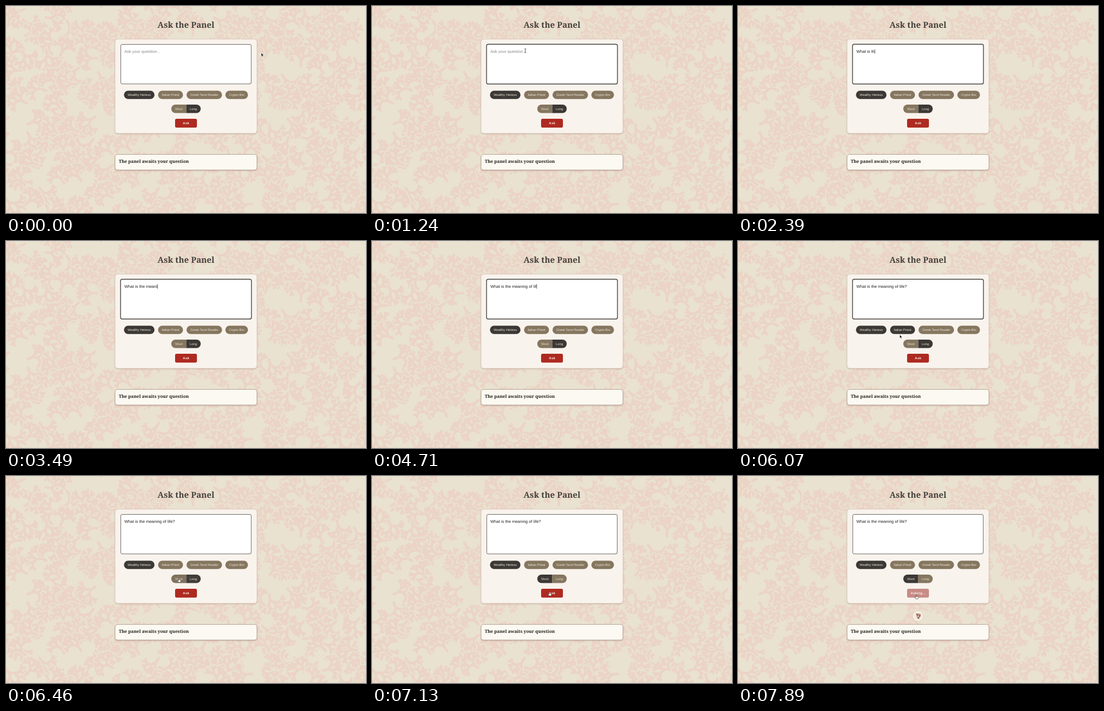
An HTML page with a canvas that plays this animation: 660x380 px, repeating every 7.99 s.

```html
<!DOCTYPE html>
<html lang="en">
<head>
<meta charset="utf-8">
<title>Ask the Panel</title>
<style>
html, body { margin: 0; width: 660px; height: 380px; overflow: hidden; background: #e9e2d0; }
canvas, svg { position: absolute; left: 0; top: 0; }
text { font-family: "Liberation Sans", Arial, sans-serif; text-rendering: geometricPrecision; }
.serif { font-family: "Noto Serif", Georgia, serif; font-weight: bold; }
.pill { font-size: 5.85px; fill: #ece4d6; text-anchor: middle; }
.ask { font-size: 6px; font-weight: bold; letter-spacing: .25px; fill: #fbeeea; text-anchor: middle; }
.field { font-size: 7.53px; }
</style>
</head>
<body>
<canvas id="coral" width="660" height="380"></canvas>
<svg width="660" height="380" viewBox="0 0 660 380">
  <defs>
    <filter id="shade" x="-5%" y="-10%" width="110%" height="130%">
      <feDropShadow dx="0" dy="1" stdDeviation="1.2" flood-color="#7d5c4c" flood-opacity=".35"/>
    </filter>
    <clipPath id="toggle"><rect x="303" y="181" width="54" height="15.5" rx="7.75"/></clipPath>
  </defs>
  <text class="serif" x="330" y="40.3" font-size="15.2" fill="#45413c" text-anchor="middle">Ask the Panel</text>
  <rect x="200" y="61" width="260" height="172.7" rx="5" fill="#f9f3ed" stroke="#dcc6ba" stroke-width=".7" filter="url(#shade)"/>
  <rect id="area" fill="#fff" stroke="#46423e"/>
  <path d="M446 142l2.5-2.5M447.6 142l1-1" stroke="#999" stroke-width=".4"/>
  <text id="field" class="field" x="217" y="86"></text>
  <rect id="caret" y="79.3" width=".7" height="8.4" fill="#222"/>
  <g id="pills"></g>
  <g clip-path="url(#toggle)">
    <rect id="short" x="303" y="181" width="27.5" height="16"/>
    <rect id="long" x="330.5" y="181" width="27" height="16"/>
  </g>
  <text class="pill" x="317" y="190.8">Short</text>
  <text class="pill" x="343.5" y="190.8">Long</text>
  <rect id="button" x="310" y="207" width="40" height="16.3" rx="2.8"/>
  <text id="ask" class="ask" x="330.2" y="217.2"></text>
  <g id="loader">
    <circle r="10" fill="#f5ecdf" stroke="#dccdbb" stroke-width=".6"/>
    <g id="spin">
      <path d="M-4-5L5-4 3 4-2 5z" fill="#d6aca2"/>
      <path d="M-3-5l3 3-2 2zM1 0l4-3-1 5zM-1 3l3-1 0 4z" fill="#69534c"/>
      <circle cx="1" cy="-3" r="1.3" fill="#b65c52"/>
    </g>
  </g>
  <rect x="200" y="272.5" width="260" height="28.5" rx="4.5" fill="#fbf9f2" stroke="#ad9787" stroke-width=".8" filter="url(#shade)"/>
  <text class="serif" x="206.7" y="288.2" font-size="8.1" fill="#24211e">The panel awaits your question</text>
  <g id="pointer">
    <path id="arrow" d="M0 0V6.4L1.5 5.1 2.6 7.5 3.6 7 2.6 4.7H4.6Z" fill="#111" stroke="#fff" stroke-width=".5"/>
    <path id="beam" d="M-1.4-3.6Q0-3.6 0-2.8Q0-3.6 1.4-3.6M0-2.8V2.8M-1.4 3.6Q0 3.6 0 2.8Q0 3.6 1.4 3.6" fill="none" stroke="#222" stroke-width=".8"/>
    <path id="hand" d="M-.7 0Q0-.9.7 0V2.5L3.2 3.2Q3.8 3.5 3.6 4.6L2.9 7H-1.2L-3 4Q-2.6 3-.7 4.4Z" fill="#fff" stroke="#222" stroke-width=".6"/>
  </g>
</svg>
<script>
const LOOP = 7990, DARK = [59, 56, 53], TAN = [133, 118, 95];
const RED = [174, 42, 32], ROSE = [200, 139, 133];
const QUESTION = "What is the meaning of life?";
const $ = id => document.getElementById(id);
const set = (el, attrs) => { for (const k in attrs) el.setAttribute(k, attrs[k]); };
const show = (id, on) => { $(id).style.display = on ? "" : "none"; };
const ramp = (t, from, span) => Math.min(1, Math.max(0, (t - from) / span));
const mix = (a, b, p) => `rgb(${a.map((v, i) => Math.round(v + (b[i] - v) * p))})`;

// Seeded coral wallpaper
function drawCoral() {
  const ctx = $("coral").getContext("2d");
  let seed = 11;
  const rnd = () => (seed = seed * 16807 % 2147483647) / 2147483647;
  function limb(path, x, y, angle, len, depth) {
    const x2 = x + Math.cos(angle) * len, y2 = y + Math.sin(angle) * len;
    path.moveTo(x, y);
    path.lineTo(x2, y2);
    if (!depth) return;
    for (const side of [-1, 1])
      limb(path, x2, y2, angle + side * (.4 + rnd() * .4), len * (.75 + rnd() * .2), depth - 1);
  }
  ctx.fillStyle = "#e9e2d0";
  ctx.fillRect(0, 0, 660, 380);
  ctx.lineCap = ctx.lineJoin = "round";
  for (let y = -10; y < 420; y += 30)
    for (let x = -10; x < 690; x += 34) {
      const path = new Path2D();
      limb(path, x + rnd() * 20, y + rnd() * 18, rnd() * 6.28, 10, 4);
      for (const [color, width] of [["#e9e2d0", 8.5], ["#ebd4c6", 4.8]]) {
        ctx.strokeStyle = color;
        ctx.lineWidth = width;
        ctx.stroke(path);
      }
    }
}

const pills = [["Wealthy Heiress", 216.3, 55.9], ["Italian Priest", 278.8, 45.7],
  ["Greek Tarot Reader", 331, 65], ["Crypto Bro", 402.2, 41.4]].map(([name, x, width]) => {
  const make = tag => $("pills").appendChild(document.createElementNS("http://www.w3.org/2000/svg", tag));
  const box = make("rect"), label = make("text");
  set(box, { x, y: 155.6, width, height: 15.2, rx: 7.6 });
  set(label, { class: "pill", x: x + width / 2, y: 165.2 });
  label.textContent = name;
  return box;
});

// Typing: time and number of characters
const keys = [[1580, 1], [1650, 2], [1700, 3], [1800, 4], [1900, 5], [2000, 6], [2100, 7], [2200, 8],
  [2300, 9], [2390, 10], [2730, 11], [2930, 12], [2990, 13], [3130, 14], [3250, 15], [3370, 16],
  [3490, 17], [3610, 18], [3810, 19], [3940, 20], [4160, 22], [4340, 24], [4710, 26], [4890, 27], [5190, 28]];

// Pointer: time, x, y
const track = [[0, 468, 86], [80, 468, 86], [400, 370, 90], [780, 284, 83], [1240, 281, 82], [5640, 281, 82],
  [5800, 290, 125], [5940, 300, 161], [6070, 296.5, 172], [6370, 317, 188], [7030, 317, 188],
  [7130, 325.5, 213], [7500, 327, 218], [7790, 327, 218.5], [LOOP, 327, 218.5]];
function pointerAt(t) {
  const i = track.findIndex(p => p[0] > t), a = track[i - 1], b = track[i];
  const p = (t - a[0]) / (b[0] - a[0]), s = p * p * (3 - 2 * p);
  return [a[1] + (b[1] - a[1]) * s, a[2] + (b[2] - a[2]) * s];
}

function draw(t) {
  const focused = t >= 880 && t < 6460;
  set($("area"), focused
    ? { x: 210, y: 70.2, width: 240, height: 73, rx: 3, "stroke-width": 1.4 }
    : { x: 210.4, y: 70.5, width: 239.2, height: 72.5, rx: 2.7, "stroke-width": .8 });

  const typed = keys.reduce((n, k) => t >= k[0] ? k[1] : n, 0);
  $("field").textContent = typed ? QUESTION.slice(0, typed) : "Ask your question...";
  $("field").setAttribute("fill", typed ? "#24211f" : "#8d8987");
  show("caret", typed && t < 5640);
  set($("caret"), { x: 217.2 + (typed ? $("field").getComputedTextLength() : 0) });

  const hover = ramp(t, 5910, 80) - ramp(t, 6075, 120);
  pills.forEach((box, i) => box.setAttribute("fill", mix(TAN, DARK, i == 0 ? 1 : i == 1 ? hover : 0)));
  const swap = ramp(t, 6455, 75);
  $("short").setAttribute("fill", mix(TAN, DARK, swap));
  $("long").setAttribute("fill", mix(DARK, TAN, swap));

  const asking = t >= 7250;
  $("button").setAttribute("fill", mix(RED, ROSE, ramp(t, 7250, 120)));
  $("ask").textContent = asking ? "Asking..." : "Ask";
  show("loader", asking);
  set($("loader"), { transform: "translate(330 257)" });
  set($("spin"), { transform: `rotate(${(t - 7890) * .36})` });

  const [x, y] = pointerAt(t);
  const overArea = x < 450 && y < 143;
  const overButton = y > 155 && y < 171 || y > 181 && y < 196 || y > 207;
  set($("pointer"), { transform: `translate(${x} ${y})` });
  show("pointer", t < 1580 || t >= 5640);
  show("beam", overArea);
  show("hand", !overArea && overButton);
  show("arrow", !overArea && !overButton);
}

drawCoral();
const start = performance.now();
(function frame() {
  draw((performance.now() - start) % LOOP);
  requestAnimationFrame(frame);
})();
</script>
</body>
</html>
```
